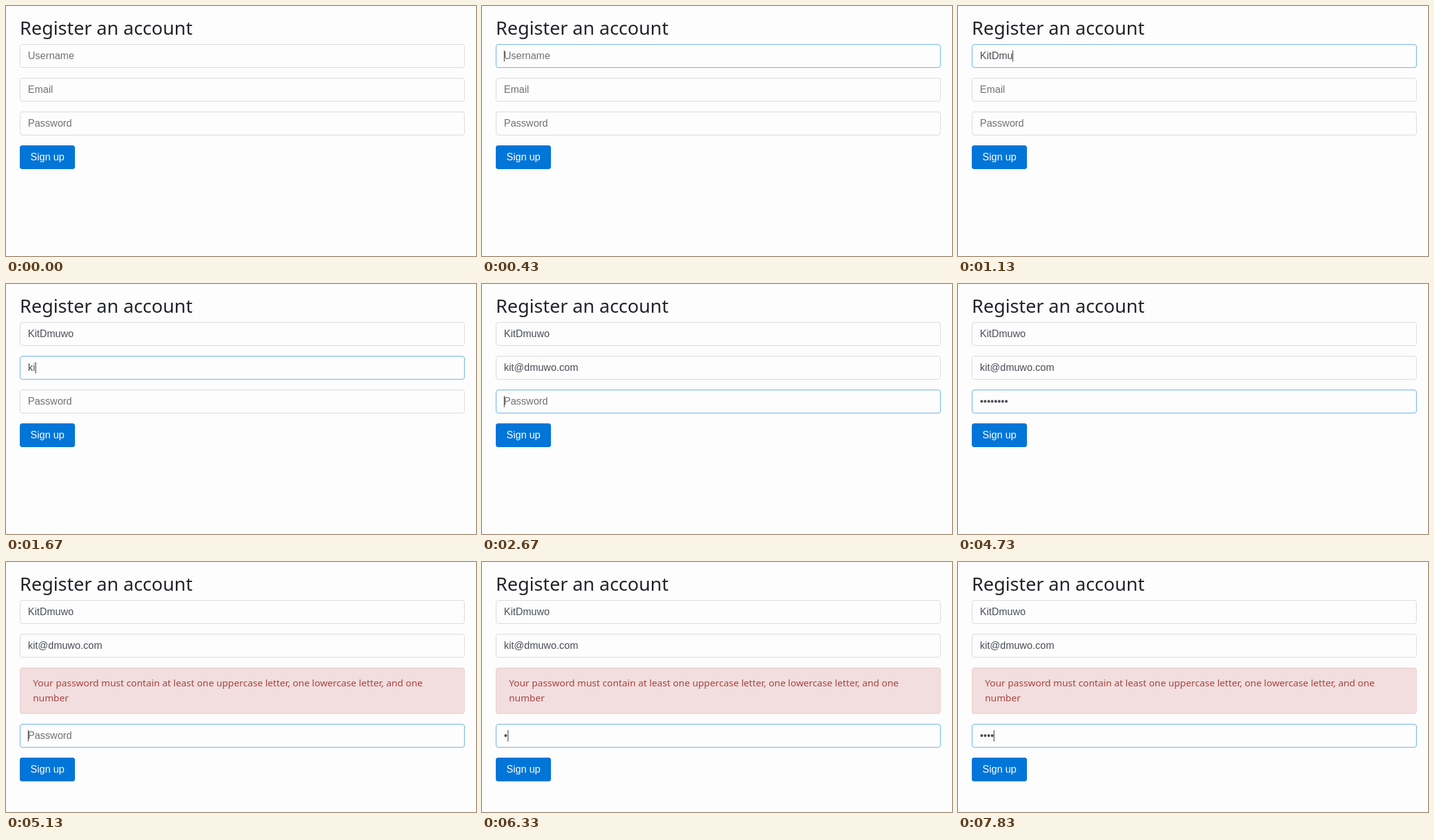
An HTML page for the animation above (8 s loop, 750 by 400 pixels).

```html
<!DOCTYPE html>
<html lang="en">
<head>
<meta charset="utf-8">
<title>Register</title>
<style>
  * { box-sizing: border-box; }
  html, body { margin: 0; width: 100%; height: 100%; overflow: hidden; background: #fdfdfd; }
  #stage {
    position: relative; width: 750px; height: 400px; overflow: hidden;
    font: 16px/24px "Liberation Sans", Arial, sans-serif;
  }
  h2 {
    position: absolute; left: 22px; top: 16px; margin: 0; white-space: nowrap;
    font: 400 29.65px/38px "Noto Sans", sans-serif; color: #212529;
  }
  .field, .alert {
    position: absolute; left: 22px; width: 710px;
    border: 1px solid #d9d9d9; border-radius: 4px;
  }
  .field { height: 38px; padding: 6px 12px; white-space: pre; color: #495057; }
  .hint { color: #6f7275; }
  .caret {
    display: inline-block; width: 1px; height: 18px; margin-right: -1px;
    vertical-align: -4px; background: #333638;
  }
  .alert {
    top: 169px; height: 74px; padding: 11px 20px; white-space: nowrap;
    font: 15.15px/24px "Noto Sans", sans-serif;
    color: #a94442; background: #f2dede; border-color: #ebcccc;
  }
  .button {
    position: absolute; left: 22px; width: 88px; height: 38px; padding: 7px 17px;
    border-radius: 4px; background: #0275d8; color: #fff; white-space: nowrap;
  }
</style>
</head>
<body>
<div id="stage">
  <h2>Register an account</h2>
  <div class="alert">Your password must contain at least one uppercase letter, one lowercase letter, and one<br>number</div>
  <div class="button">Sign up</div>
</div>
<script>
const LOOP = 8000, REJECTED = 4970, BLINK = 500, FADE = 150;
const IDLE = [217, 217, 217], ACTIVE = [102, 175, 233];
const stage = document.getElementById('stage');
const alertBox = stage.querySelector('.alert');
const button = stage.querySelector('.button');

const every = (start, step, count) => Array.from({ length: count }, (_, i) => start + i * step);

// Each visit: focus time, leave time, text, key times.
const fields = [
  { hint: 'Username', top: 61, visits: [
    { from: 200, to: 1430, text: 'KitDmuwo', keys: every(560, 102, 8) }] },
  { hint: 'Email', top: 115, visits: [
    { from: 1430, to: 2530, text: 'kit@dmuwo.com', keys: every(1540, 72, 13) }] },
  { hint: 'Password', top: 169, visits: [
    { from: 2530, to: REJECTED, text: '•'.repeat(8), keys: every(2870, 125, 8) },
    { from: REJECTED, to: LOOP, text: '•'.repeat(4), keys: [6330, 6500, 7300, 7600] }] }
];

function add(parent, tag, cls) {
  const el = document.createElement(tag);
  el.className = cls;
  return parent.appendChild(el);
}

for (const f of fields) {
  f.box = add(stage, 'div', 'field');
  f.value = add(f.box, 'span', 'value');
  f.caret = add(f.box, 'i', 'caret');
  f.label = add(f.box, 'span', 'hint');
  f.label.textContent = f.hint;
  f.box.style.top = f.top + 'px';
}

const ease = x => {
  x = Math.min(1, Math.max(0, x));
  return x * x * (3 - 2 * x);
};

function drawField(f, t) {
  const visit = f.visits.filter(v => t >= v.from).pop();
  let text = '', glow = 0, caret = false;
  if (visit) {
    const pressed = visit.keys.filter(k => k <= t);
    text = visit.text.slice(0, pressed.length);
    glow = ease((t - visit.from) / FADE) - ease((t - visit.to) / FADE);
    const last = pressed.length ? pressed[pressed.length - 1] : visit.from;
    caret = t < visit.to && (t - last) % (2 * BLINK) < BLINK;
  }
  f.value.textContent = text;
  f.label.style.display = text ? 'none' : 'inline';
  f.caret.style.visibility = caret ? 'visible' : 'hidden';
  f.box.style.borderColor = `rgb(${IDLE.map((c, i) => Math.round(c + (ACTIVE[i] - c) * glow))})`;
}

function draw(t) {
  const shift = t >= REJECTED ? 90 : 0;
  fields.forEach(f => drawField(f, t));
  fields[2].box.style.top = 169 + shift + 'px';
  button.style.top = 223 + shift + 'px';
  alertBox.style.display = shift ? 'block' : 'none';
}

const start = performance.now();
function tick() {
  draw((performance.now() - start) % LOOP);
  requestAnimationFrame(tick);
}
tick();
</script>
</body>
</html>
```
